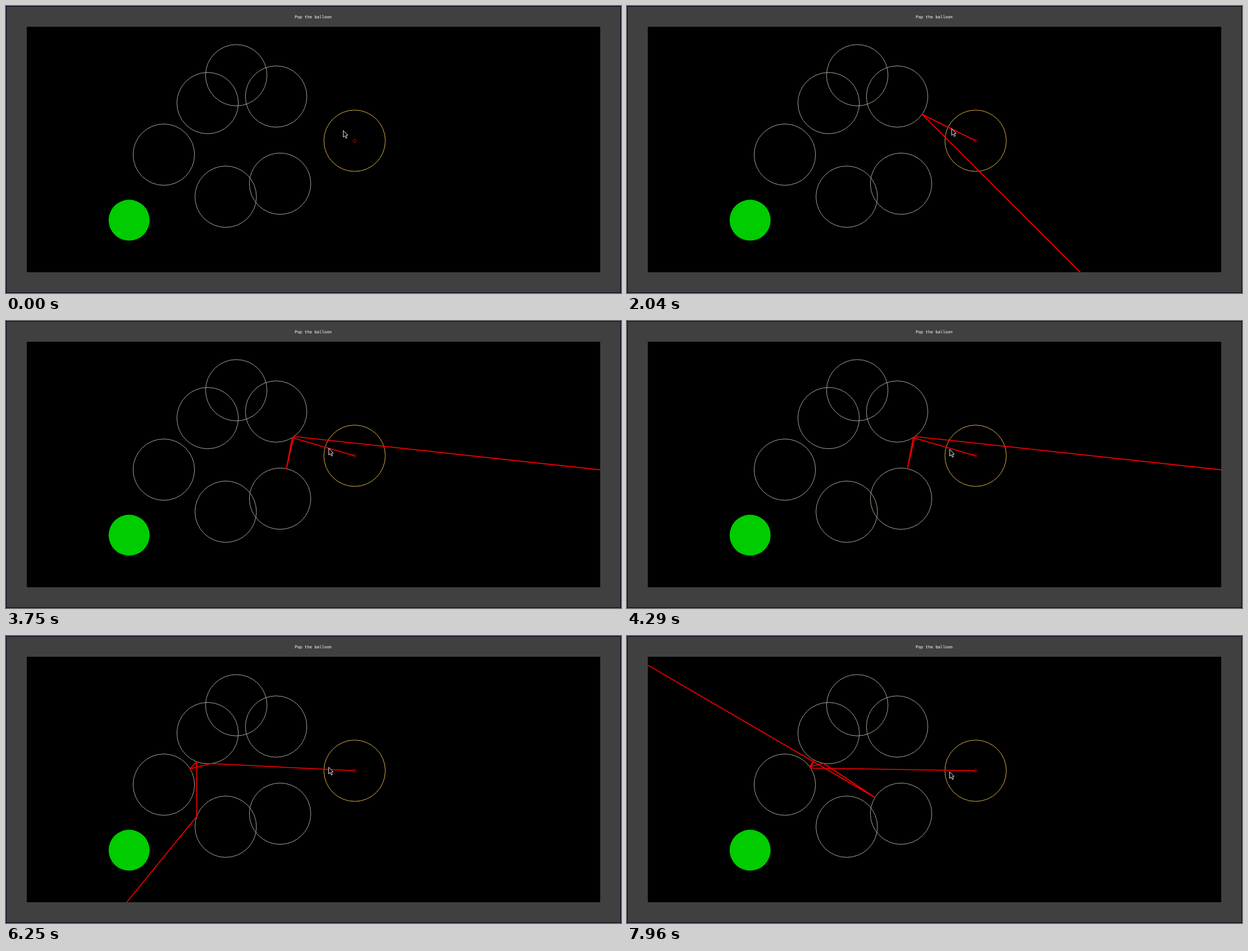
These frames come from a looping animation (1095x512 px, 8000 ms). An HTML page with a canvas:

```html
<!DOCTYPE html>
<html lang="en">
<head>
<meta charset="utf-8">
<title>Pop the balloon</title>
<style>
  html, body { margin: 0; width: 100%; height: 100%; overflow: hidden; background: #404040; }
  canvas { display: block; }
</style>
</head>
<body>
<canvas id="stage" width="1095" height="512"></canvas>
<script>
const ctx = document.getElementById('stage').getContext('2d');
const LOOP = 8000, RADIUS = 54.7;
const launcher = [620.7, 240.4], chamber = [400, 245];
const mirrors = [[410, 123.5], [359, 173.2], [481, 161.5], [281, 265.2], [391.2, 340.2], [488, 317]];

// A shot bounces off the listed mirrors in order and leaves the arena at the exit.
const shots = [
  { at: 1880, hits: [2], exit: [807, 475] },
  { at: 3540, hits: [2, 5, 2], exit: [1058, 265.5] },
  { at: 4600, hits: [2, 4, 3, 1, 4, 3, 4, 1], exit: [1058, 438] },
  { at: 5420, hits: [1, 3, 1, 4], exit: [215, 475] },
  { at: 6640, hits: [1, 4, 1, 4, 1], exit: [1058, 421] },
  { at: 7000, hits: [3, 1, 3, 1, 5], exit: [37, 52] }
];

// Pointer tip: time, x, y
const pointer = [
  [0, 600.5, 222], [830, 518.5, 222], [1700, 578, 218.7], [2300, 578, 218.7],
  [3450, 574.7, 227], [4000, 574.7, 227], [5000, 574.5, 236.7],
  [6250, 574.5, 234], [7400, 574.5, 242], [LOOP, 574.5, 242]
];
const arrow = [[0, 0], [0, 12], [2.7, 9.6], [4.7, 14], [6.7, 13.1], [4.8, 9], [8, 8.5]];

const add = (a, b, k = 1) => [a[0] + b[0] * k, a[1] + b[1] * k];
function unit([x, y]) {
  const length = Math.hypot(x, y) || 1;
  return [x / length, y / length];
}
const toward = (from, to) => unit(add(to, from, -1));

// Reflection gives the shortest path, so slide each bounce until its normal bisects the ray.
function reflect({ hits, exit }) {
  const centers = hits.map(i => mirrors[i]);
  const normals = centers.map(c => toward(c, chamber));
  const path = [launcher, ...centers.map((c, i) => add(c, normals[i], RADIUS)), exit];
  for (let pass = 0; pass < 2000; pass++) {
    centers.forEach((c, i) => {
      const p = path[i + 1];
      const bisector = add(toward(p, path[i]), toward(p, path[i + 2]));
      normals[i] = unit(add(normals[i], bisector, 0.1));
      path[i + 1] = add(c, normals[i], RADIUS);
    });
  }
  return path;
}
for (const shot of shots) shot.path = reflect(shot);

function pointerAt(t) {
  const i = pointer.findIndex(k => k[0] > t);
  const [t0, ...a] = pointer[i - 1], [t1, ...b] = pointer[i];
  const p = (t - t0) / (t1 - t0);
  return add(a, add(b, a, -1), p * p * (3 - 2 * p));
}

function tracePath(points) {
  ctx.beginPath();
  for (const [x, y] of points) ctx.lineTo(x, y);
}

function circle([x, y], r) {
  ctx.beginPath();
  ctx.arc(x, y, r, 0, Math.PI * 2);
}

function stroke(color, width = 1) {
  ctx.lineWidth = width;
  ctx.strokeStyle = color;
  ctx.stroke();
}

function ring(center, r, color) {
  circle(center, r);
  stroke(color);
}

function drawBoard() {
  ctx.fillStyle = '#404040';
  ctx.fillRect(0, 0, 1095, 512);
  ctx.lineWidth = 1;
  ctx.strokeStyle = '#000020';
  ctx.strokeRect(0.5, 0.5, 1094, 511);
  ctx.fillStyle = '#000';
  ctx.fillRect(37, 37, 1021, 438);
  ctx.fillStyle = '#fff';
  ctx.font = '7.3px "DejaVu Sans Mono", monospace';
  ctx.textAlign = 'center';
  ctx.fillText('Pop the balloon', 547, 21.7);
  ctx.fillStyle = '#00cc00';
  circle([219.2, 382.1], 36.5);
  ctx.fill();
  for (const m of mirrors) ring(m, RADIUS, '#aaa89a');
  ring(launcher, RADIUS, '#d9b34a');
  ring(launcher, 2.8, '#d00000');
}

function drawShot(t) {
  const shot = shots.findLast(s => s.at <= t);
  if (!shot) return;
  tracePath(shot.path);
  ctx.lineJoin = 'round';
  stroke('#ea0000', 1.9);
}

function drawPointer(t) {
  const tip = pointerAt(t);
  tracePath(arrow.map(point => add(tip, point)));
  ctx.closePath();
  ctx.fillStyle = '#000';
  ctx.fill();
  ctx.lineJoin = 'miter';
  stroke('#eee');
}

const start = performance.now();
function frame() {
  const t = (performance.now() - start) % LOOP;
  drawBoard();
  drawShot(t);
  drawPointer(t);
  requestAnimationFrame(frame);
}
frame();
</script>
</body>
</html>
```
